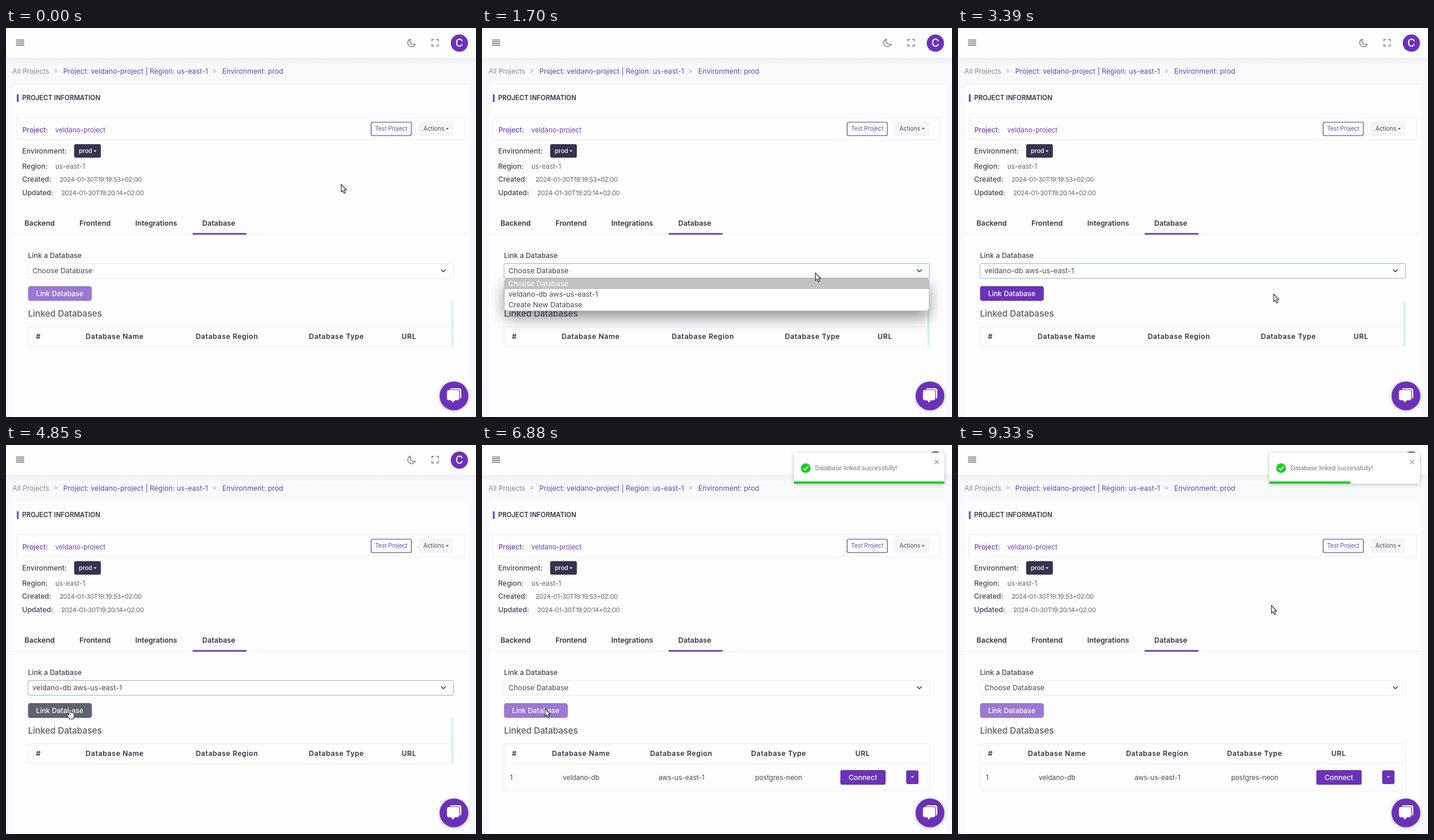
An HTML page for the animation above (9.36 s loop, 800 by 663 pixels).

```html
<!DOCTYPE html>
<html lang="en">
<head>
<meta charset="utf-8">
<title>Link a database</title>
<style>
html, body { margin: 0; width: 100%; height: 100%; overflow: hidden; background: #fefdff; }
svg { display: block; width: 800px; height: 663px; font: 12px Inter, sans-serif; }
.mid { text-anchor: middle; }
.med { font-weight: 500; }
.link { fill: #6b45ac; }
.muted { fill: #8b8893; }
.label { fill: #47434f; font-weight: 500; }
.value { fill: #68646f; font-size: 11.4px; }
.date { fill: #68646f; font-size: 11px; letter-spacing: -.4px; }
.tab { fill: #38353f; font-size: 12.3px; font-weight: 600; }
.field { fill: #4b4753; font-size: 12.2px; }
.picked { fill: #fff; }
.head { fill: #34313a; font-size: 11.9px; font-weight: 600; letter-spacing: .6px; }
.white { fill: #fff; }
.purple { fill: #6a32b8; }
.box { fill: none; stroke: #efedf3; }
.line { fill: none; stroke: #77737e; stroke-width: 1.3; }

/* shared loop */
.loop { animation: 9.36s step-end infinite; }
#form { animation-name: form; }
#before { animation-name: before; }
#after { animation-name: after; }
#menu { animation-name: menu; }
#first { animation-name: first; }
#second { animation-name: second; }
#choose { animation-name: choose; }
#picked { animation-name: picked; }
#focus { animation-name: focus; }
#loader { animation-name: loader; }
#arrow { animation-name: arrow; }
#hand { animation-name: hand; }
#button { animation-name: button; animation-timing-function: linear; }
#cursor { animation-name: move; animation-timing-function: ease-in-out; }
#toast { animation-name: bounce; animation-timing-function: cubic-bezier(.215, .61, .355, 1); }
#bar { animation-name: shrink; animation-timing-function: linear; transform-box: fill-box; transform-origin: left; }
#spin { animation: spin 1.04s -.15s linear infinite; }

@keyframes form { 0% { opacity: 1 } 52.8% { opacity: 0 } 68%, 100% { opacity: 1 } }
@keyframes before { 0% { opacity: 1 } 52.8%, 100% { opacity: 0 } }
@keyframes after { 0% { opacity: 0 } 68%, 100% { opacity: 1 } }
@keyframes menu { 0% { opacity: 0 } 11.1% { opacity: 1 } 29.9%, 100% { opacity: 0 } }
@keyframes first { 0% { opacity: 1 } 26.4%, 100% { opacity: 0 } }
@keyframes second { 0% { opacity: 0 } 26.4%, 100% { opacity: 1 } }
@keyframes choose { 0% { opacity: 1 } 29.9% { opacity: 0 } 60%, 100% { opacity: 1 } }
@keyframes picked { 0% { opacity: 0 } 29.9% { opacity: 1 } 60%, 100% { opacity: 0 } }
@keyframes focus { 0% { opacity: 0 } 11.1% { opacity: 1 } 60%, 100% { opacity: 0 } }
@keyframes loader { 0% { opacity: 0 } 52.8% { opacity: 1 } 68%, 100% { opacity: 0 } }
@keyframes arrow { 0% { opacity: 1 } 44.7% { opacity: 0 } 52.8%, 100% { opacity: 1 } }
@keyframes hand { 0% { opacity: 0 } 44.7% { opacity: 1 } 52.8%, 100% { opacity: 0 } }
@keyframes button {
  0%, 29.9% { fill: #9b78d3; stroke: #9b78d3 }
  31.5%, 44.7% { fill: #6a32b8; stroke: #6a32b8 }
  46.3%, 60% { fill: #5d636d; stroke: #6441a0 }
  60.1%, 100% { fill: #9b78d3; stroke: #9b78d3 }
}
@keyframes move {
  0%, 1% { transform: translate(570px, 266px) }
  9.6%, 24.3% { transform: translate(567px, 417px) }
  27.8%, 31% { transform: translate(562px, 452px) }
  34.2% { transform: translate(556px, 452px); animation-timing-function: ease-in }
  36.2% { transform: translate(538px, 453px); animation-timing-function: linear }
  44.4% { transform: translate(146px, 453px); animation-timing-function: ease-out }
  48.1%, 90.3% { transform: translate(107px, 449px) }
  99.5%, 100% { transform: translate(533px, 273px) }
}
@keyframes bounce {
  0%, 67.63% { transform: translateX(2400px); opacity: 0 }
  72.12% { transform: translateX(-20px); opacity: 1 }
  73.24% { transform: translateX(8px) }
  74.36% { transform: translateX(-4px) }
  75.11%, 100% { transform: none; opacity: 1 }
}
@keyframes shrink { 0%, 75.11% { transform: none } 100% { transform: scaleX(.534) } }
@keyframes spin { to { transform: rotate(360deg) } }
</style>
</head>
<body>
<svg viewBox="0 0 800 663">
  <defs>
    <linearGradient id="shade" x2="0" y2="1">
      <stop stop-color="#eeeff2"/><stop offset="1" stop-color="#f7f9fa"/>
    </linearGradient>
    <filter id="soft" x="-10%" y="-100%" width="120%" height="350%">
      <feDropShadow dx="0" dy="12" stdDeviation="13" flood-opacity=".42"/>
    </filter>
    <filter id="lift" x="-20%" y="-40%" width="140%" height="190%">
      <feDropShadow dx="0" dy="1" stdDeviation="3" flood-opacity=".26"/>
    </filter>
  </defs>

  <!-- page -->
  <rect width="800" height="663" fill="#f7f9fa"/>
  <rect y="51" width="800" height="12" fill="url(#shade)"/>
  <rect width="800" height="51" fill="#fefdff"/>
  <rect x="12" y="97" width="776" height="570" fill="#fefdff"/>

  <!-- top bar -->
  <path class="line" d="M17 20.5H31M17 23.5H31M17 26.5H31M17 29.5H31"/>
  <path class="line" d="M688.5 18.8A6.6 6.6 0 1 0 696.6 27.4A6.2 6.2 0 0 1 688.5 18.8Z" stroke-linejoin="round"/>
  <path class="line" d="M725 23V19.5H728.5M732.5 19.5H736V23M736 27V30.5H732.5M728.5 30.5H725V27"/>
  <circle class="purple" cx="771.7" cy="25.8" r="14.7"/>
  <text class="white mid med" x="771.7" y="32.3" font-size="18">C</text>

  <!-- breadcrumb -->
  <text class="muted" x="11" y="78" font-size="11.8">All Projects</text>
  <text x="81" y="77" font-size="13" fill="#c2c0c9">»</text>
  <text class="link" x="97.5" y="78">Project: veldano-project | Region: us-east-1</text>
  <text x="351" y="77" font-size="13" fill="#c2c0c9">»</text>
  <text class="link" x="368" y="78">Environment: prod</text>

  <!-- project information -->
  <rect x="18.5" y="113" width="3" height="13" fill="#6a45b2"/>
  <text x="27.5" y="123" font-size="11.1" font-weight="600" fill="#35323c">PROJECT INFORMATION</text>
  <rect class="box" x="18.5" y="152.5" width="762" height="38"/>
  <text class="link med" x="28" y="177.5" font-size="11.8">Project:</text>
  <text class="link" x="84" y="177.5" font-size="11.4">veldano-project</text>
  <rect x="621.5" y="160.5" width="68.5" height="23" rx="3" fill="#fff" stroke="#5c4596" stroke-width="1.2"/>
  <text class="link mid" x="655.7" y="175" font-size="9.8">Test Project</text>
  <rect x="702.5" y="160" width="59" height="24" rx="3" fill="#f5f4f7"/>
  <text x="710.5" y="175" font-size="10" fill="#53505a">Actions</text>
  <path d="M748.5 170.5h5l-2.5 2.7z" fill="#53505a"/>
  <text class="label" x="27.5" y="213.5">Environment:</text>
  <rect x="116" y="198" width="45.5" height="23" rx="3" fill="#37324f"/>
  <text class="white med" x="124" y="213" font-size="10.3">prod</text>
  <path class="white" d="M149 208.5h5l-2.5 2.7z"/>
  <text class="label" x="27.5" y="240">Region:</text>
  <text class="value" x="84" y="239.5">us-east-1</text>
  <text class="label" x="27.5" y="262">Created:</text>
  <text class="date" x="91" y="262">2024-01-30T19:19:53+02:00</text>
  <text class="label" x="27.5" y="285">Updated:</text>
  <text class="date" x="94" y="285">2024-01-30T19:20:14+02:00</text>

  <!-- tabs -->
  <text class="tab" x="31.5" y="336.5">Backend</text>
  <text class="tab" x="125" y="336.5">Frontend</text>
  <text class="tab" x="220" y="336.5">Integrations</text>
  <text class="tab" x="334" y="336.5">Database</text>
  <path d="M12 351.5H788" stroke="#edebf0"/>
  <rect x="317.5" y="349.5" width="92" height="2.7" rx="1" fill="#673ab3"/>

  <g id="form" class="loop">
    <text class="label" x="37.5" y="391.5">Link a Database</text>
    <rect x="37.5" y="401.5" width="724" height="25" rx="2" fill="#fff" stroke="#eceaf0"/>
    <rect id="focus" class="loop" x="37.5" y="401.5" width="724" height="25" rx="2" fill="none" stroke="#92bbc2"/>
    <text id="choose" class="loop field" x="45" y="418">Choose Database</text>
    <text id="picked" class="loop field" x="45" y="418">veldano-db aws-us-east-1</text>
    <path d="M740.5 411.5l4 4l4-4" fill="none" stroke="#3c3943" stroke-width="1.5"/>
    <rect id="button" class="loop" x="38" y="440.5" width="107.5" height="24" rx="3"/>
    <text class="white mid med" x="91.5" y="456.5" font-size="11.9">Link Database</text>
    <text class="med" x="37.5" y="491.5" font-size="14.8" fill="#5b5765">Linked Databases</text>
    <text class="head" x="51" y="530">#</text>
  </g>

  <g id="before" class="loop">
    <path class="box" d="M758 509.5H37.5V542.5H758"/>
    <rect x="758" y="465" width="4" height="78" fill="#d5f5ea"/>
    <text class="head mid" x="185" y="530">Database Name</text>
    <text class="head mid" x="376" y="530">Database Region</text>
    <text class="head mid" x="562.5" y="530">Database Type</text>
    <text class="head mid" x="686" y="530">URL</text>
  </g>

  <g id="after" class="loop">
    <path class="box" d="M37.5 509.5H761.5V589.5H37.5ZM37.5 542.5H761.5"/>
    <text class="head mid" x="168.5" y="530">Database Name</text>
    <text class="head mid" x="339" y="530">Database Region</text>
    <text class="head mid" x="505" y="530">Database Type</text>
    <text class="head mid" x="648" y="530">URL</text>
    <g fill="#4b4753" font-size="11.5">
      <text x="47.5" y="570.5">1</text>
      <text class="mid" x="168.7" y="570.5">veldano-db</text>
      <text class="mid" x="339.5" y="570.5">aws-us-east-1</text>
      <text class="mid" x="505" y="570.5">postgres-neon</text>
    </g>
    <rect class="purple" x="610" y="554" width="77" height="25" rx="3"/>
    <text class="white mid med" x="648.3" y="570.5">Connect</text>
    <rect class="purple" x="722" y="554.5" width="21" height="23.5" rx="3"/>
    <path class="white" d="M730 564.5h5l-2.5 2.7z"/>
  </g>

  <g id="menu" class="loop">
    <rect x="38" y="427" width="723" height="55" rx="5" fill="#fff" filter="url(#soft)"/>
    <g id="first" class="loop">
      <path d="M38 445V432q0-5 5-5H756q5 0 5 5V445Z" fill="#c3c1c4"/>
      <text class="field picked" x="45" y="440">Choose Database</text>
      <text class="field" x="45" y="458">veldano-db aws-us-east-1</text>
    </g>
    <g id="second" class="loop">
      <rect x="38" y="445" width="723" height="18" fill="#c3c1c4"/>
      <text class="field" x="45" y="440">Choose Database</text>
      <text class="field picked" x="45" y="458">veldano-db aws-us-east-1</text>
    </g>
    <text class="field" x="45" y="476">Create New Database</text>
    <rect x="38" y="427" width="723" height="55" rx="5" fill="none" stroke="#b9b7bc" stroke-width=".8"/>
  </g>

  <g id="loader" class="loop">
    <g transform="translate(400 600)">
      <g id="spin">
        <path id="blade" d="M-10.5-8.5L-4-10Q-6-5-1 4.5L-5 7.5Q-12 2-10.5-8.5Z"/>
        <use href="#blade" transform="rotate(180)"/>
      </g>
    </g>
  </g>

  <!-- chat button -->
  <circle class="purple" cx="762.5" cy="627" r="24.5" filter="url(#lift)"/>
  <rect class="white" x="755" y="614" width="20" height="18" rx="4"/>
  <path d="M754 616.500H768q4 0 4 4V631q0 4-4 4H764.500L760.500 639.500L757.500 635H754q-4 0-4-4V620.500q0-4 4-4Z" fill="#fff" stroke="#6a32b8" stroke-width="1.2"/>

  <g id="toast" class="loop">
    <rect x="530" y="13" width="256" height="53" rx="2" fill="#fff" filter="url(#lift)"/>
    <circle cx="550" cy="39.5" r="8.3" fill="#17cf21"/>
    <path d="M546 39.7l3 3l5.3-6" fill="none" stroke="#fff" stroke-width="1.8"/>
    <text x="566" y="43" fill="#77757b" style="font:10.7px 'Liberation Sans',Arial,sans-serif">Database linked successfully!</text>
    <path class="line" d="M769.5 25.5l7 7m0-7l-7 7" opacity=".75"/>
    <rect id="bar" class="loop" x="530" y="62" width="256" height="4" fill="#1ad424"/>
  </g>

  <g id="cursor" class="loop" fill="#fff" stroke="#29272e" stroke-width="1.1" stroke-linejoin="round">
    <path id="arrow" class="loop" d="M.5.5V13.4L3.4 10.8L5.4 15.7L7.7 14.7L5.7 9.9H9.5Z"/>
    <path id="hand" class="loop" d="M.2 2.2Q.2.6 1.5.6T2.8 2.2V6.8Q4.6 6 5.2 7.3Q6.9 6.8 7.3 8.2Q9 8 9 9.8V13Q9 15 7.8 16V18H.5V16.5Q-2 14-4 10.7Q-3.7 9-1.8 10L.2 11.7Z"/>
  </g>
</svg>
</body>
</html>
```
